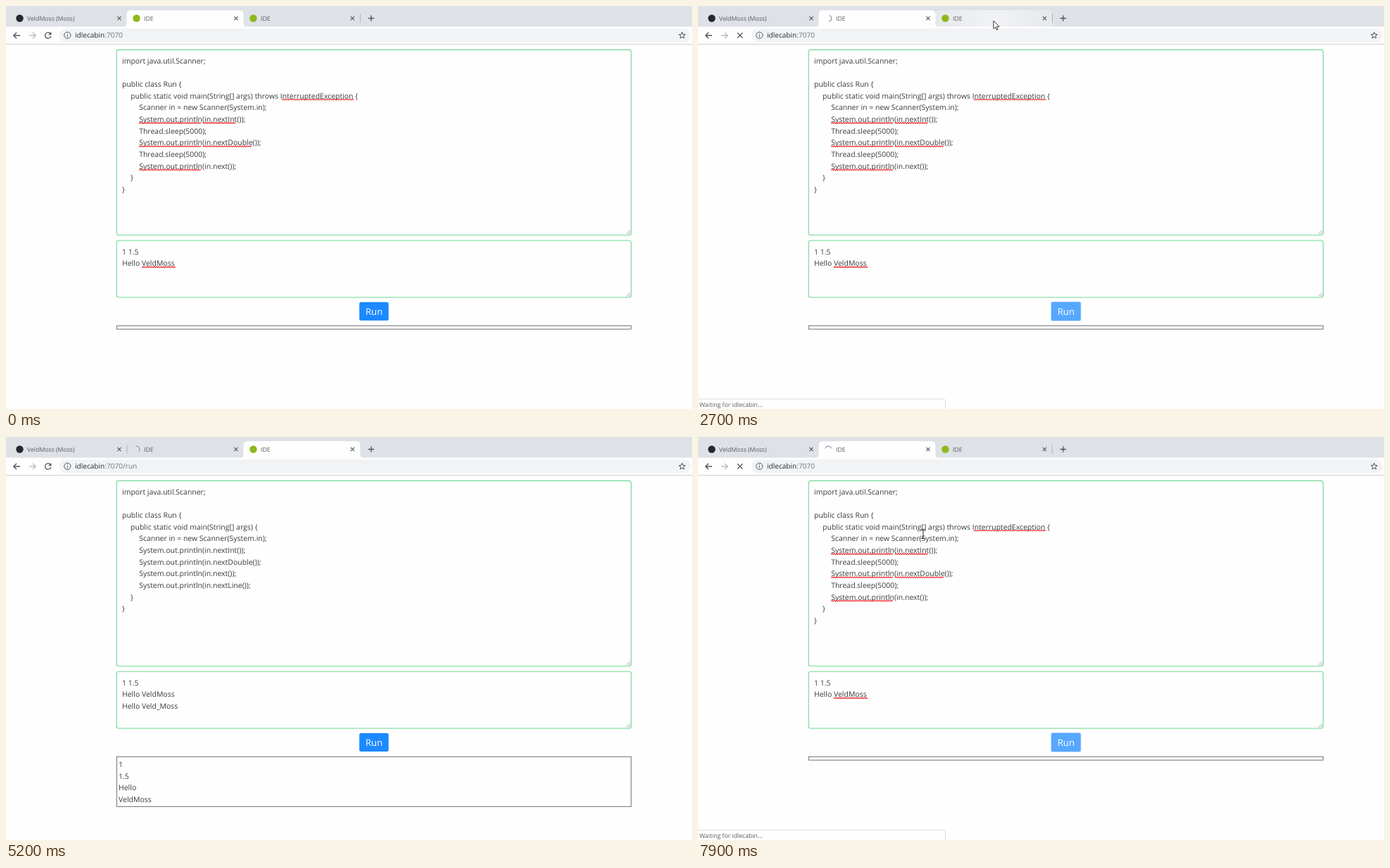
An HTML page for the animation above (8 s loop, 975x574 px).

```html
<!DOCTYPE html>
<html lang="en">
<head>
<meta charset="utf-8">
<title>Browser IDE</title>
<style>
html, body { margin: 0; width: 100%; height: 100%; overflow: hidden; background: #fefefe; }
svg { display: block; width: 100%; height: 100%; font-family: "Open Sans", "Noto Sans", sans-serif; }
text { white-space: pre; text-rendering: geometricPrecision; }
.code { font-size: 10.47px; fill: #363b41; }
.tab { font-size: 8.7px; fill: #575b60; }
.url { font-size: 10.1px; fill: #2a2d30; }
.icon { fill: none; stroke: #505458; stroke-width: 1.3; }
.wave { fill: none; stroke: #ee2429; stroke-width: 1.1; }
.area { fill: #fefefe; stroke: #6fd893; stroke-width: 1.1; }
.grip { fill: none; stroke: #777; stroke-width: .7; }
</style>
</head>
<body>
<svg viewBox="0 0 975 574" preserveAspectRatio="none">
  <defs>
    <radialGradient id="glow" gradientUnits="userSpaceOnUse" cx="420" cy="18" r="85">
      <stop offset="0" stop-color="#f2f3f5"/>
      <stop offset="1" stop-color="#e6e8ec"/>
    </radialGradient>
  </defs>
  <rect width="975" height="574" fill="#fefefe"/>
  <rect width="975" height="30" fill="#dee1e6"/>
  <g id="hover"></g>
  <path id="activeTab" fill="#fefefe"/>
  <path id="divider" stroke="#a5a8ad" stroke-width=".8"/>
  <g id="chrome"></g>
  <path id="spinner" fill="none" stroke="#9a9da1" stroke-width="1.2"/>
  <g id="page"></g>
  <g id="status">
    <path d="M-1 559.8H348.500Q351.500 559.800 351.500 562.800V575H-1Z" fill="#fefefe" stroke="#d5d7da" stroke-width=".8"/>
    <text class="tab" x="2" y="570.500">Waiting for idlecabin...</text>
  </g>
  <g id="tip">
    <rect x="268" y="35" width="23" height="14" fill="#000" opacity=".2"/>
    <rect x="266" y="32.500" width="23" height="14.500" fill="#fff" stroke="#8b8b8b" stroke-width=".8"/>
    <text class="tab" x="270.500" y="42.800">IDE</text>
  </g>
  <g id="cursor" stroke-linejoin="round">
    <path id="arrow" d="M0 0V11.500L2.700 9L4.500 13L6.300 12.200L4.500 8.300H8.200Z" fill="#fff" stroke="#222" stroke-width=".9"/>
    <path id="beam" d="M-3 -6.500H-.8L0 -6L.8 -6.500H3M0 -6V6M-3 6.500H-.8L0 6L.8 6.500H3" fill="none" stroke="#333" stroke-width="1"/>
    <path id="hand" d="M-1.300 1Q-1.300 -.5 0 -.5T1.300 1V6L4.800 6.800Q6.800 7.300 6.700 9.300L6 13.500Q5.600 14.500 5.600 16H-.4Q-1 14 -2.300 12.500L-4 9.500Q-4 7.800 -2.300 8.800L-1.300 10Z" fill="#fff" stroke="#222" stroke-width=".9"/>
  </g>
</svg>
<script>
const $ = id => document.getElementById(id);
const show = (id, on) => $(id).setAttribute('visibility', on ? 'visible' : 'hidden');
const label = (cls, x, y, s, extra = '') => `<text class="${cls}" x="${x}" y="${y}" ${extra}>${s}</text>`;
const icon = (d, extra = '') => `<path class="icon" d="${d}" ${extra}/>`;
const dot = (x, fill) => `<circle cx="${x}" cy="17.5" r="5.2" fill="${fill}"/>`;
const cross = (x, y, r) => `M${x - r} ${y - r}l${2 * r} ${2 * r}m0 ${-2 * r}l${-2 * r} ${2 * r}`;
const tabPath = x => `M${x - 6} 30Q${x} 30 ${x} 24V12Q${x} 6 ${x + 6} 6H${x + 160}Q${x + 166} 6 ${x + 166} 12V24Q${x + 166} 30 ${x + 172} 30Z`;

const LINE = 16.67, LEAF = '#8cb81c';
const PRINT = 'System.out.println(in.';
const head = ['import java.util.Scanner;', '', 'public class Run {'];
const slow = [...head,
  '    public static void main(String[] args) throws InterruptedException {',
  '        Scanner in = new Scanner(System.in);',
  `        ${PRINT}nextInt());`,
  '        Thread.sleep(5000);',
  `        ${PRINT}nextDouble());`,
  '        Thread.sleep(5000);',
  `        ${PRINT}next());`,
  '    }', '}'];
const fast = [...head,
  '    public static void main(String[] args) {',
  '        Scanner in = new Scanner(System.in);',
  ...['nextInt', 'nextDouble', 'next', 'nextLine'].map(m => `        ${PRINT}${m}());`),
  '    }', '}'];

// Right end of the spelling mark for each reader call
const callEnd = { nextInt: 326, nextDouble: 348.5, nextLine: 333.5 };

function wave(x, end, y) {
  let d = `M${x} ${y}`;
  for (let i = 0; x + i * 1.6 < end; i++) d += `l1.6 ${i % 2 ? 1.3 : -1.3}`;
  return `<path class="wave" d="${d}"/>`;
}

function codeLine(s, y, spell) {
  const body = s.trimStart();
  let out = label('code', 165 + (s.length - body.length) * 3.02, y, body);
  if (!spell) return out;
  if (body.startsWith(PRINT)) {
    out += wave(189, 277, y + 2.2);
    const end = callEnd[body.slice(PRINT.length, -4)];
    if (end) out += wave(280, end, y + 2.2);
  }
  if (body.includes('Interrupted')) out += wave(392, 494, y + 2.2);
  return out;
}

function area(y, h, focus) {
  const ring = focus ? `<rect x="156.5" y="${y - .5}" width="732.5" height="${h + 1}" rx="3.5" fill="none" stroke="#bdeecb" stroke-width="2.6"/>` : '';
  return ring + `<rect class="area" x="157.2" y="${y}" width="731.3" height="${h}" rx="3"/>` +
    `<path class="grip" d="M882 ${y + h - 1.5}l5-5m-2 5l2-2"/>`;
}

function page(s) {
  let out = area(62.4, 263.8) + area(334, 81, s.focus);
  (s.second ? fast : slow).forEach((l, i) => out += codeLine(l, 81.7 + i * LINE, s.spell));
  const input = ['1 1.5', 'Hello VeldMoss'];
  if (s.second) input.push('Hello Veld_Moss');
  input.forEach((l, i) => out += label('code', 165, 353.7 + i * LINE, l));
  if (s.spell) out += wave(193, 240, 372.5);
  if (s.focus) {
    const [x, y] = s.second ? [245.5, 376] : [240.7, 359.3];
    out += `<path d="M${x} ${y}v13.5" stroke="#222" stroke-width="1"/>`;
  }
  if (s.pressed) out += '<rect x="501.5" y="421.1" width="43" height="27.6" rx="2" fill="#a5d0ff"/>';
  out += `<rect x="502.2" y="421.8" width="41.600" height="26.200" rx="2.5" fill="${s.lit ? '#57a7ff' : '#1b89ff'}"/>`;
  out += label('run', 511, 440.4, 'Run', 'font-size="13.1" fill="#fff"');
  out += `<rect x="157.4" y="455.4" width="731" height="${s.result ? 71 : 4.8}" fill="#fefefe" stroke="#666" stroke-width=".9"/>`;
  if (s.result) ['1', '1.5', 'Hello', 'VeldMoss'].forEach((l, i) => out += label('code', 160, 470 + i * LINE, l));
  return out;
}

function chrome(s) {
  let out = dot(19.5, '#24292e') + label('tab', 30, 20.7, 'VeldMoss (Moss)');
  [196, 362].forEach(x => out += label('tab', x, 20.7, 'IDE'));
  [161, 327, 492.5].forEach(x => out += icon(cross(x, 17.5, 2.6), 'style="stroke-width:1.1"'));
  if (!s.spin) out += dot(185.5, LEAF);
  out += dot(351.5, LEAF);
  out += icon('M514.8 17.5h8.4M519 13.3v8.4');
  out += '<rect y="29.5" width="975" height="24.5" fill="#fefefe"/><path d="M0 54.5H975" stroke="#cfd1d4"/>';
  out += '<rect x="76" y="32" width="897" height="19.5" rx="9.7" fill="#f1f3f4"/>';
  out += icon('M20 42H11M15 37.8L10.800 42L15 46.200');
  out += icon('M33 42H42M38 37.800L42.200 42L38 46.200', 'style="stroke:#b9bbbe"');
  out += s.busy ? icon(cross(59.7, 41.8, 3.7)) :
    icon('M63.200 39.500A4.200 4.200 0 1 0 63.800 43') + '<path d="M64.400 37v4.300h-4.300z" fill="#505458"/>';
  out += '<circle class="icon" cx="87.300" cy="41.700" r="4.600" style="stroke-width:1"/>' + icon('M87.300 41v3.300M87.300 38.900v1.100', 'style="stroke-width:1"');
  out += label('url', 98, 45.2, `idlecabin<tspan fill="#73777c">:7070${s.result ? '/run' : ''}</tspan>`);
  let star = '';
  for (let i = 0; i < 10; i++) {
    const a = i * Math.PI / 5, r = i % 2 ? 2.1 : 4.8;
    star += `${i ? 'L' : 'M'}${961 + r * Math.sin(a)} ${42 - r * Math.cos(a)}`;
  }
  return out + icon(star + 'Z', 'style="stroke-width:1"');
}

// Values between [time, ...values] keys
function track(keys, t) {
  const i = keys.findIndex(k => k[0] > t);
  if (i < 0) return keys[keys.length - 1].slice(1);
  if (!i) return keys[0].slice(1);
  const a = keys[i - 1], b = keys[i], f = (t - a[0]) / (b[0] - a[0]);
  return a.slice(1).map((v, j) => v + (b[j + 1] - v) * f);
}

const mouse = [
  [500, 844, 157], [900, 600, 405], [1000, 556, 446], [1100, 531, 436], [1700, 531, 436],
  [2400, 424, 40], [2600, 420, 21], [3000, 420, 21], [3400, 440, 190], [3900, 517, 436],
  [4400, 517, 436], [5000, 398, 160], [5100, 376, 107], [5200, 278, -15], [5400, 270, -5],
  [5800, 266, 18], [6900, 266, 18], [7600, 320, 138]
];
const turn = [[1600, 270], [2700, 5], [4100, -390], [5200, -750], [6500, -1130], [7900, -1530]];

function cursor(t, s, x, y) {
  const overArea = x > 157 && x < 889 && (y > 62 && y < 327 || y > 334 && y < 415);
  const kind = s.overRun ? 'hand' : overArea ? 'beam' : 'arrow';
  ['hand', 'beam', 'arrow'].forEach(k => show(k, t >= 500 && k === kind));
  $('cursor').setAttribute('transform', `translate(${x} ${y})`);
}

function spinner(t, on) {
  show('spinner', on);
  const at = deg => {
    const a = deg * Math.PI / 180;
    return `${185.3 + 4.4 * Math.cos(a)} ${17.5 + 4.4 * Math.sin(a)}`;
  };
  const [mid] = track(turn, t);
  $('spinner').setAttribute('d', `M${at(mid - 75)}A4.4 4.4 0 0 1 ${at(mid + 75)}`);
}

let last = '';
function draw(t) {
  const [x, y] = track(mouse, t);
  const second = t >= 2900 && t < 6100;
  const result = t >= 4600 && second;
  const overRun = t >= 500 && x > 502 && x < 544 && y > 421 && y < 448;
  const spin = t >= 1700;
  const pressed = second ? t >= 4200 && !result : t >= 1600;
  const s = {
    second, result, overRun, spin, pressed,
    lit: pressed || overRun && !result,
    focus: second ? t < 4100 : t === 1500,
    spell: !result,
    busy: second ? t >= 4200 && !result : spin
  };
  const key = JSON.stringify(s);
  if (key !== last) {
    $('page').innerHTML = page(s);
    $('chrome').innerHTML = chrome(s);
    last = key;
  }
  $('activeTab').setAttribute('d', tabPath(second ? 337.5 : 171.5));
  $('divider').setAttribute('d', (second ? 'M172 11V24' : 'M503.500 11V24'));
  const idleX = second ? 171.5 : 337.5;
  const hover = t >= 500 && y > 5 && y < 30 && x > idleX && x < idleX + 166;
  $('hover').innerHTML = hover ? `<path d="${tabPath(idleX)}" fill="url(#glow)"/>` : '';
  $('glow').setAttribute('cx', x);
  show('status', t >= 1800 && !second);
  show('tip', t >= 6400 && t < 7000);
  spinner(t, spin);
  cursor(t, s, x, y);
}

function tick() {
  draw(Math.floor(performance.now() % 8000 / 100) * 100);
  requestAnimationFrame(tick);
}
tick();
</script>
</body>
</html>
```
